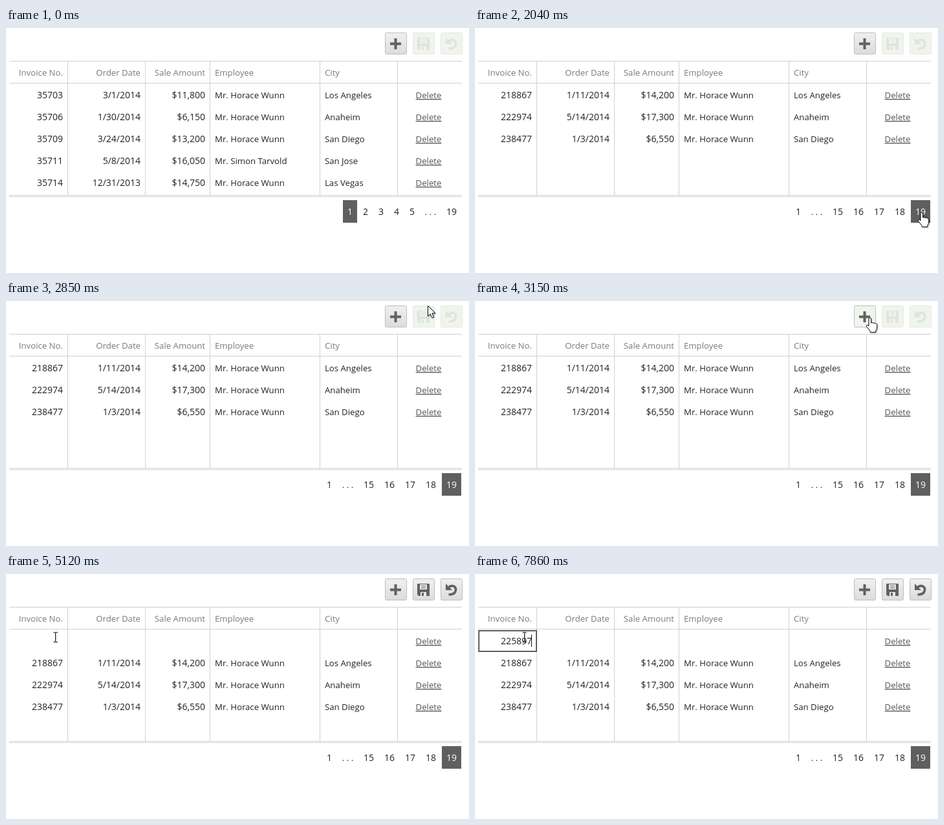
These frames come from a looping animation (716x380 px, 8 s). An HTML page:

```html
<!DOCTYPE html>
<html lang="en">
<head>
<meta charset="utf-8">
<title>Invoice grid</title>
<style>
  html, body { margin: 0; width: 100%; height: 100%; overflow: hidden; background: #fff; }
  svg { display: block; width: 716px; height: 380px; }
  text { font: 13.2px "Open Sans", "Noto Sans", sans-serif; fill: #222; white-space: pre; }
  .num { font-size: 14px; }
  .head { fill: #7a7a7a; }
  .link { fill: #555; text-decoration: underline; }
  .on { fill: #fff; }
  .line { fill: #d0d0d0; }
  .face { fill: url(#face); stroke: #bdbdbd; }
  .hover .face { fill: #eff5ec; }
  .ink { fill: #616161; }
  .arc { fill: none; stroke: #616161; stroke-width: 3.6; }
  .gap { fill: #e8e8e8; }
  .off .face { fill: #eff4ec; stroke: #e5eae2; }
  .off .ink { fill: #dfe5da; }
  .off .arc { stroke: #dfe5da; }
  .off .gap { fill: #eff4ec; }
  #cursor { filter: drop-shadow(1px 1px 1px rgba(0,0,0,.35)); }
  #cursor path { fill: #fff; stroke: #111; stroke-linejoin: round; }
</style>
</head>
<body>
<svg id="stage" viewBox="0 0 716 380" xmlns="http://www.w3.org/2000/svg">
  <defs>
    <linearGradient id="face" x2="0" y2="1">
      <stop stop-color="#f0f0f0"/><stop offset="1" stop-color="#dcdcdc"/>
    </linearGradient>
  </defs>
  <g id="add">
    <rect class="face" x="586.5" y="7.5" width="33" height="33" rx="2"/>
    <path class="ink" d="M594 22.5h6.5V16h4v6.5h6.5v4h-6.5V33h-4v-6.5H594z"/>
  </g>
  <g id="tools">
    <rect class="face" x="629.5" y="7.5" width="33" height="33" rx="2"/>
    <path class="ink" d="M636 15h19v19h-17l-2-2z"/>
    <path class="gap" d="M640 16h11v8h-11zM641 28h9v6h-9z"/>
    <path class="ink" d="M642 18h7v1h-7zM642 21h7v1h-7zM643 29h3v5h-3z"/>
    <rect class="face" x="672.5" y="7.5" width="33" height="33" rx="2"/>
    <path class="ink" d="M680 15v10h10z"/>
    <path class="arc" d="M684 21C690 15.500 696 19.500 695.500 25S690 32 684.500 32"/>
  </g>
  <g id="grid"></g>
  <g id="first"></g>
  <g id="last"></g>
  <g id="fresh"></g>
  <g id="edit">
    <rect x="6" y="88" width="89" height="32" fill="#fff" stroke="#5f5f5f" stroke-width="2"/>
    <text id="typed" class="num" x="88" y="109" text-anchor="end"></text>
    <rect id="caret" x="87" y="94" width="1" height="19" fill="#111"/>
  </g>
  <g id="cursor">
    <path id="arrow" d="M.5.5v16l3.700-3.500 2.600 6 2.700-1.200-2.600-5.800h5z"/>
    <path id="hand" d="M-2 2q0-2 1.700-2T1.500 2v6q2-1 3.500.4 1.800-1 3 .5 2.200-.4 2.700 1.600v4.500q0 3-2 5v2.500H.2v-2L-5.500 13.500q-.8-2 .8-2.300T-2 13z"/>
    <path id="beam" d="M-3-7h2.500l.5.5.5-.5H3M0-6.500v14M-3 8h2.500l.5-.5.500.5H3" style="fill:none"/>
  </g>
</svg>
<script>
const $ = id => document.getElementById(id);
const LOOP = 8000, STEP = 30, ROW = 34;
const PAGE = 2040, INSERT = 4210, FOCUS = 5280;
const rightEdges = [88, 208, 308], leftEdges = [323, 493];
const A = "Mr. Horace Wunn", B = "Mr. Simon Tarvold";

function make(parent, tag, attrs, content = "") {
  const node = document.createElementNS("http://www.w3.org/2000/svg", tag);
  for (const key in attrs) node.setAttribute(key, attrs[key]);
  node.textContent = content;
  return parent.appendChild(node);
}
const label = (parent, x, y, content, anchor, cls) =>
  make(parent, "text", { x, y, "text-anchor": anchor, class: cls }, content);
const line = (x, y, width, height) =>
  make($("grid"), "rect", { x, y, width, height, class: "line" });
const remove = (parent, y) => label(parent, 653.5, y, "Delete", "middle", "link");

function cells(parent, values, y, cls) {
  values.forEach((v, i) => i < 3
    ? label(parent, rightEdges[i], y, v, "end", cls || "num")
    : label(parent, leftEdges[i - 3], y, v, "start", cls || ""));
}

function page(parent, rows, pager, active, boxX, boxW) {
  const body = make(parent, "g", {});
  rows.forEach((row, i) => {
    cells(body, row, 109 + i * ROW);
    remove(body, 109 + i * ROW);
  });
  make(parent, "rect", { x: boxX, y: 267, width: boxW, height: 35, fill: "#5f5f5f" });
  pager.forEach(([x, v]) => label(parent, x, 290, v, "middle",
    v === ". . ." ? "" : v === active ? "num on" : "num"));
  return body;
}

line(5, 51, 700, 1);
line(5, 85, 700, 1);
line(5, 259, 700, 1);
line(5, 261, 700, 1);
for (const x of [95, 215, 315, 485, 605]) line(x, 52, 1, 207);
cells($("grid"), ["Invoice No.", "Order Date", "Sale Amount", "Employee", "City"], 74, "head");

page($("first"), [
  ["35703", "3/1/2014", "$11,800", A, "Los Angeles"],
  ["35706", "1/30/2014", "$6,150", A, "Anaheim"],
  ["35709", "3/24/2014", "$13,200", A, "San Diego"],
  ["35711", "5/8/2014", "$16,050", B, "San Jose"],
  ["35714", "12/31/2013", "$14,750", A, "Las Vegas"]
], [[532, "1"], [556, "2"], [580, "3"], [604, "4"], [628, "5"], [656.5, ". . ."], [689, "19"]],
  "1", 521, 22);

const lastRows = page($("last"), [
  ["218867", "1/11/2014", "$14,200", A, "Los Angeles"],
  ["222974", "5/14/2014", "$17,300", A, "Anaheim"],
  ["238477", "1/3/2014", "$6,550", A, "San Diego"]
], [[500, "1"], [528.5, ". . ."], [561, "15"], [593, "16"], [625, "17"], [657, "18"], [689, "19"]],
  "19", 674, 30);

remove($("fresh"), 109);

// Pointer stops: time, x, y
const path = [
  [1190, 704, 288], [1310, 691, 286], [2200, 691, 286], [2350, 695, 250],
  [2480, 695, 250], [2820, 657, 4], [3000, 626, 23], [3150, 611, 26],
  [4210, 611, 26], [4370, 593, 31], [4400, 593, 31], [4990, 78, 106],
  [5020, 79, 103], [5120, 76, 98], [LOOP, 76, 98]
];
const keys = [6140, 6340, 6840, 6870, 7100, 7860];

function pointer(t) {
  const i = path.findIndex(p => p[0] > t);
  const [t0, x0, y0] = path[i - 1], [t1, x1, y1] = path[i];
  const q = Math.max(t0, t1 - Math.ceil((t1 - t) / STEP) * STEP);
  let k = (q - t0) / (t1 - t0);
  if (t1 - t0 > 300) k = k * k * (3 - 2 * k);
  return [x0 + (x1 - x0) * k, y0 + (y1 - y0) * k];
}

const show = (node, on) => { node.style.display = on ? "" : "none"; };
const within = (t, from, to) => t >= from && t < to;

function draw(t) {
  const added = t >= INSERT;
  show($("first"), t < PAGE);
  show($("last"), t >= PAGE);
  show($("fresh"), added);
  lastRows.setAttribute("transform", `translate(0 ${added ? ROW : 0})`);
  $("tools").setAttribute("class", added ? "" : "off");

  show($("edit"), t >= FOCUS);
  $("typed").textContent = "225897".slice(0, keys.filter(k => k <= t).length);
  show($("caret"), t >= 5310 && !within(t, 5640, 6140) && !within(t, 7600, 7860));

  const visible = t >= path[0][0];
  show($("cursor"), visible);
  let over = false;
  if (visible) {
    const [x, y] = pointer(t).map(Math.round);
    over = x >= 586 && x < 620 && y >= 7 && y < 41;
    const link = over || (x >= 674 && y >= 267);
    const beam = t >= 5020;
    $("cursor").setAttribute("transform", beam ? `translate(${x + .5} ${y - .5})` : `translate(${x} ${y})`);
    show($("hand"), link);
    show($("beam"), beam);
    show($("arrow"), !link && !beam);
  }
  $("add").setAttribute("class", over ? "hover" : "");
}

const start = performance.now();
function tick() {
  draw((performance.now() - start) % LOOP);
  requestAnimationFrame(tick);
}
tick();
</script>
</body>
</html>
```
